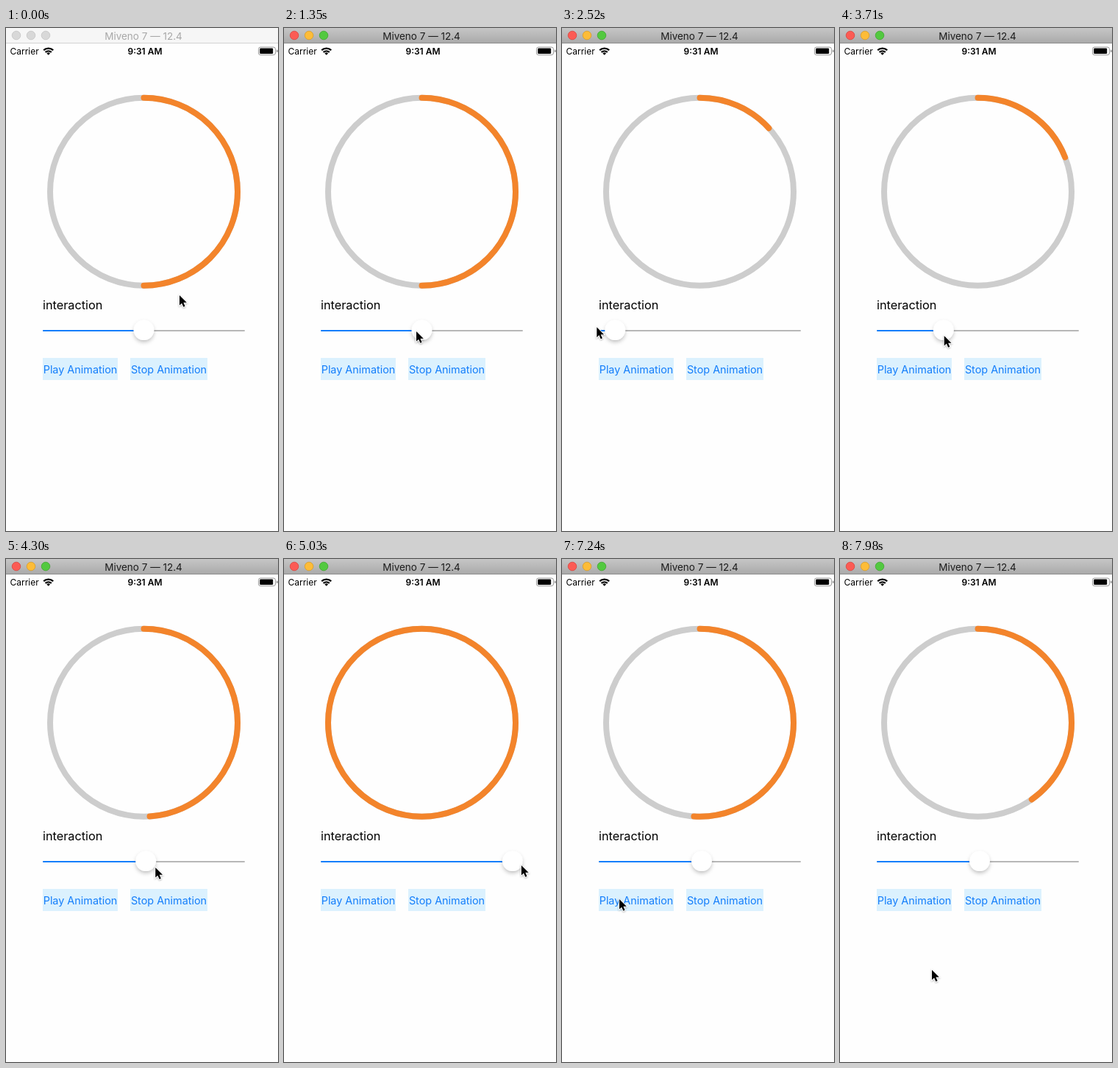
Write an HTML page that moves like this. It is 370 px wide and 683 px high and loops after 8000 ms.

```html
<!DOCTYPE html>
<html lang="en">
<head>
<meta charset="utf-8">
<title>Progress ring</title>
<style>
  html, body { margin: 0; width: 100%; height: 100%; overflow: hidden; background: #fefefe; }
  svg { display: block; width: 370px; height: 683px; font-family: Inter, Roboto, sans-serif; }
  .ring { fill: none; stroke-width: 8; }
  .button { fill: #dbf1fe; }
  .link { fill: #147efb; font-size: 14.4px; }
  .inactive .light { fill: #d8d8d8; stroke: #c5c5c5; }
  .inactive #bar { fill: #f6f6f6; }
  .inactive #barEdge { fill: #d2d2d2; }
  .inactive #title { fill: #a8a8a8; }
</style>
</head>
<body>
<svg viewBox="0 0 370 683">
  <defs>
    <linearGradient id="metal" x2="0" y2="1">
      <stop stop-color="#c6c6c6"/><stop offset="1" stop-color="#aaa"/>
    </linearGradient>
    <filter id="thumbShadow" x="-50%" y="-50%" width="200%" height="200%">
      <feDropShadow dx="0" dy="0.3" stdDeviation="0.5" flood-opacity=".22"/>
      <feDropShadow dx="0" dy="3" stdDeviation="2.6" flood-opacity=".2"/>
    </filter>
    <filter id="cursorShadow" x="-50%" y="-50%" width="200%" height="200%">
      <feDropShadow dx="0" dy="1" stdDeviation="0.8" flood-opacity=".35"/>
    </filter>
  </defs>

  <g id="titleBar">
    <rect id="bar" width="370" height="20" fill="url(#metal)"/>
    <rect id="barEdge" y="20" width="370" height="1" fill="#8d8d8d"/>
    <g stroke-width=".8">
      <circle class="light" cx="14" cy="10" r="5.8" fill="#fc5b54" stroke="#d8453f"/>
      <circle class="light" cx="34" cy="10" r="5.8" fill="#fdbc38" stroke="#d99d27"/>
      <circle class="light" cx="54" cy="10" r="5.8" fill="#53c940" stroke="#3fa62f"/>
    </g>
    <text id="title" x="187" y="16" font-size="13.5" text-anchor="middle" fill="#1c1c1c">Miveno 7 — 12.4</text>
  </g>

  <g id="statusBar">
    <text x="5.5" y="35.5" font-size="12">Carrier</text>
    <g fill="none" stroke="#000" stroke-width="2.3">
      <path d="M51.2 30.2A9.4 9.4 0 0 1 64.2 30.2M53.6 32.9A6 6 0 0 1 61.8 32.9"/>
      <path d="M57.7 36.8L55.4 34.4A3.3 3.3 0 0 1 60 34.4Z" fill="#000" stroke="none"/>
    </g>
    <text x="189" y="35.5" font-size="12" font-weight="600" text-anchor="middle">9:31 AM</text>
    <rect x="343.5" y="26" width="23" height="10.6" rx="2.6" fill="none" stroke="#999"/>
    <rect x="345.2" y="27.6" width="18" height="7.4" rx="1.2"/>
    <path d="M368 29.3Q369.6 29.8 369.6 31.3T368 33.3Z" fill="#888"/>
  </g>

  <circle class="ring" cx="187.5" cy="222.2" r="127.5" stroke="#cdcdcd"/>
  <circle class="ring" id="arc" cx="187.5" cy="222.2" r="127.5" stroke="#f3842b"
          stroke-linecap="round" pathLength="1" transform="rotate(-90 187.5 222.2)"/>

  <text x="50" y="382" font-size="16.3">interaction</text>
  <rect x="50" y="410" width="275" height="2" rx="1" fill="#b7b7b7"/>
  <rect id="filled" x="50" y="410" height="2" rx="1" fill="#147efb"/>
  <circle id="thumb" cy="410" r="14" fill="#fff" filter="url(#thumbShadow)"/>

  <rect class="button" x="50" y="448" width="102" height="30"/>
  <rect class="button" x="169" y="448" width="105" height="30"/>
  <text class="link" id="play" x="101" y="468.5" text-anchor="middle">Play Animation</text>
  <text class="link" x="221.5" y="468.5" text-anchor="middle">Stop Animation</text>

  <path id="cursor" d="M0 0V13.6L3.1 10.7L5.4 15.8L7.6 14.8L5.4 9.8H9.8Z" stroke="#fff"
        stroke-width="1.6" paint-order="stroke" filter="url(#cursorShadow)"/>
</svg>
<script>
  const LOOP = 8000;
  const TICK = 147.7; // the screen updates in steps of this many ms
  const MIN_X = 64, MAX_X = 311; // travel of the slider thumb
  const PRESS = 50, PLAY = 50.5, PLAY_LENGTH = 8; // in ticks

  // Pointer gestures, in ticks; a drag carries the thumb along.
  const home = { x: 236, y: 363 };
  const gestures = [
    { from: 3, to: 9, x: 180, y: 412 },
    { from: 10.25, to: 18.25, x: 39, y: 406, drag: true },
    { from: 20.3, to: 26.6, x: 160, y: 420, drag: true },
    { from: 27.5, to: 32, x: 333, y: 416, drag: true },
    { from: 32.9, to: 38.8, x: 212, y: 415, drag: true },
    { from: 41, to: 49, x: 78, y: 462 },
    { from: PRESS, to: 54, x: 125, y: 558 }
  ];

  const $ = id => document.getElementById(id);
  const clamp = (v, low, high) => Math.min(high, Math.max(low, v));
  const ease = p => (1 - Math.cos(Math.PI * clamp(p, 0, 1))) / 2;

  function pointerAt(tick) {
    let { x, y } = home, thumb = (MIN_X + MAX_X) / 2;
    for (const g of gestures) {
      const p = ease((tick - g.from) / (g.to - g.from));
      const dx = (g.x - x) * p;
      x += dx;
      y += (g.y - y) * p;
      if (g.drag) thumb = clamp(thumb + dx, MIN_X, MAX_X);
      if (p < 1) break;
    }
    return { x, y, thumb };
  }

  // The thumb trails the pointer by one tick, the ring by two.
  function progressAt(tick) {
    if (tick > PLAY) return ease((tick - PLAY) / PLAY_LENGTH);
    return (pointerAt(tick - 2).thumb - MIN_X) / (MAX_X - MIN_X);
  }

  function draw(now) {
    const tick = Math.floor(now % LOOP / TICK);
    const { x, y } = pointerAt(tick);
    const { thumb } = pointerAt(tick - 1);
    const progress = progressAt(tick);

    $('titleBar').setAttribute('class', tick < 1 ? 'inactive' : '');
    $('thumb').setAttribute('cx', thumb);
    $('filled').setAttribute('width', thumb - 50);
    $('arc').setAttribute('stroke-dasharray', progress < 1 ? `${progress} 2` : 'none');
    $('arc').setAttribute('visibility', progress > 0 ? 'visible' : 'hidden');
    $('play').setAttribute('opacity', tick === PRESS ? .2 : 1);
    $('cursor').setAttribute('transform', `translate(${x} ${y})`);
  }

  const start = performance.now();
  function loop() {
    draw(performance.now() - start);
    requestAnimationFrame(loop);
  }
  loop();
</script>
</body>
</html>
```
